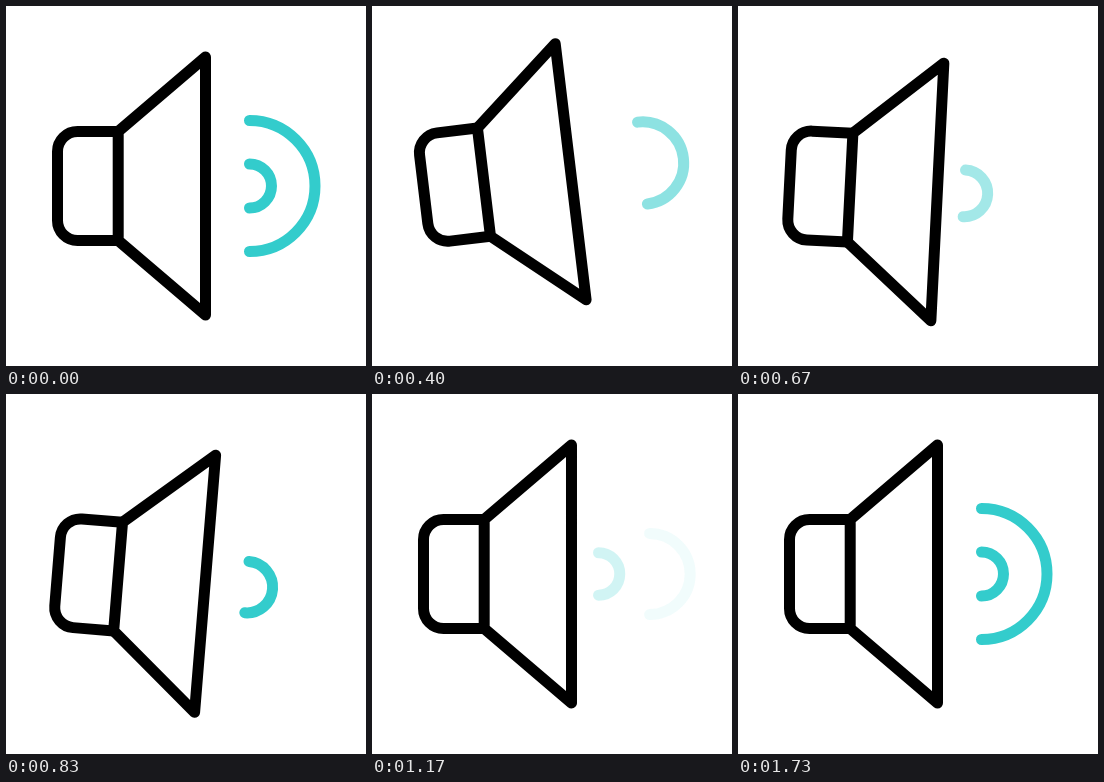
An HTML page for the animation above (2 s loop, 360 px wide and 360 px high).

```html
<!DOCTYPE html>
<html lang="en">
<head>
<meta charset="utf-8">
<title>Speaker</title>
<style>
  html, body { margin: 0; width: 100%; height: 100%; overflow: hidden; background: #fff; }
  svg { display: block; width: 100%; height: 100%; }
  path { fill: none; stroke-width: 11; stroke-linecap: round; stroke-linejoin: round; }
  .body { stroke: #000; }
  .wave { stroke: #33cccc; }
</style>
</head>
<body>
<svg viewBox="0 0 360 360">
  <g id="speaker">
    <path class="body" d="M112.2 125.5H71.5a20 20 0 0 0-20 20v69a20 20 0 0 0 20 20H112.2"/>
    <path class="body" d="M112.2 125.5L199.5 51V309L112.2 234.5Z"/>
  </g>
</svg>
<script>
const LOOP = 2000, LAST_STEP = 52, STEPS_PER_SECOND = 30, FADE = 300, MID = 180;
const speaker = document.getElementById('speaker');

const easeIn = power => p => p ** power;
const easeOut = power => p => 1 - (1 - p) ** power;
const easeInOut = p => p < .5 ? 4 * p ** 3 : 1 - 4 * (1 - p) ** 3;
const progress = (t, from, to) => Math.min(1, Math.max(0, (t - from) / (to - from)));
const mix = (a, b, p) => a + (b - a) * p;

// The speaker swings between these turning points: time, degrees.
const swings = [[100, 0], [475, -7.1], [775, 5.2], [1010, -3.4], [1180, 0]];

function tilt(t) {
  return swings.reduce((angle, [time, next], i) =>
    i ? mix(angle, next, easeInOut(progress(t, swings[i - 1][0], time))) : next, 0);
}

// Resting shapes of the two waves, which share a centre.
const BIG = { x: 243.5, r: 65.5 }, SMALL = { x: 243.5, r: 22 };
const settle = easeOut(1.7);

const waves = [
  { start: 0, end: 367, from: BIG, to: { x: 262, r: 80 }, fadeOut: 67 },
  { start: 0, end: 470, from: SMALL, to: { x: 273, r: 42 }, fadeOut: 267 },
  { start: 533, end: 1187, from: { x: 218, r: 23 }, to: { x: 280, r: 42 },
    fadeIn: 533, fadeOut: 887, move: easeIn(1.25), grow: easeIn(2.5) },
  { start: 1100, end: 1733, from: { x: 223, r: 12 }, to: BIG, fadeIn: 1100 },
  { start: 1167, end: 1733, from: { x: 220, r: .5 }, to: SMALL, fadeIn: 1167 }
];

for (const wave of waves) {
  wave.path = document.createElementNS('http://www.w3.org/2000/svg', 'path');
  wave.path.setAttribute('class', 'wave');
  speaker.appendChild(wave.path);
}

function drawWave(wave, t) {
  const { path, start, end, from, to, move = settle, grow = settle,
    fadeIn = -FADE, fadeOut = LOOP } = wave;
  const p = progress(t, start, end);
  const x = mix(from.x, to.x, move(p)), r = mix(from.r, to.r, grow(p));
  path.setAttribute('d', `M${x} ${MID - r}A${r} ${r} 0 0 1 ${x} ${MID + r}`);
  path.setAttribute('opacity',
    progress(t, fadeIn, fadeIn + FADE) - progress(t, fadeOut, fadeOut + FADE));
}

function draw(t) {
  speaker.setAttribute('transform', `rotate(${tilt(t)} 80 ${MID})`);
  for (const wave of waves) drawWave(wave, t);
}

// Steps begin on whole hundredths of a second; the last one holds until the loop ends.
function stepTime(ms) {
  const step = Math.floor((Math.floor(ms / 10) * 3 + 1) / 10);
  return Math.min(step, LAST_STEP) * 1000 / STEPS_PER_SECOND;
}

const begin = performance.now();
function tick() {
  draw(stepTime((performance.now() - begin) % LOOP));
  requestAnimationFrame(tick);
}
tick();
</script>
</body>
</html>
```
